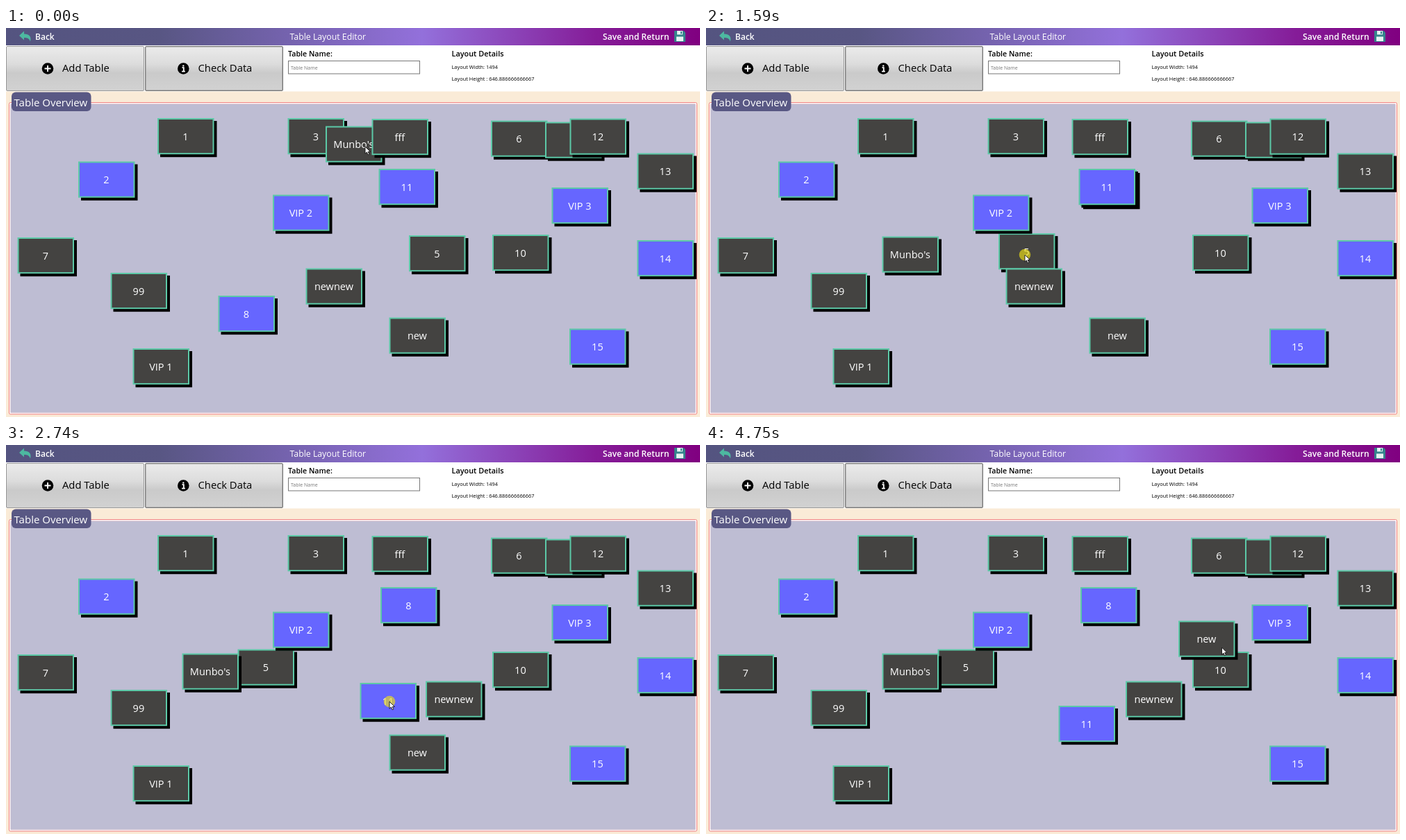
Animation, 999 px wide and 561 px high, one loop 4800 ms. Source, as an HTML page:

```html
<!DOCTYPE html>
<html lang="en">
<head>
<meta charset="utf-8">
<title>Table Layout Editor</title>
<style>
  html, body { margin: 0; width: 100%; height: 100%; overflow: hidden; background: #faebd7; }
  svg { display: block; width: 999px; height: 561px; font-family: "Open Sans", "Noto Sans", sans-serif; }
  .bold { font-weight: 600; }
  .light { fill: #fff; }
  .card rect { fill: #444341; stroke: #5cc9a7; stroke-width: 2; filter: drop-shadow(4px 4px 0.6px #000); }
  .card.blue rect { fill: #6666ff; }
  .card text { fill: #fff; font-size: 14.5px; font-weight: 500; text-anchor: middle; }
</style>
</head>
<body>
<svg viewBox="0 0 999 561">
  <defs>
    <linearGradient id="bar">
      <stop offset="0" stop-color="#545480"/>
      <stop offset=".22" stop-color="#585683"/>
      <stop offset=".6" stop-color="#9370db"/>
      <stop offset=".85" stop-color="#851c98"/>
      <stop offset="1" stop-color="#800080"/>
    </linearGradient>
    <linearGradient id="steel" x2="0" y2="1">
      <stop offset="0" stop-color="#ebebeb"/>
      <stop offset=".4" stop-color="#dcdcdc"/>
      <stop offset=".6" stop-color="#cacaca"/>
      <stop offset="1" stop-color="#d2d2d2"/>
    </linearGradient>
  </defs>

  <rect width="999" height="561" fill="#faebd7"/>
  <rect y="25" width="999" height="66.5" fill="#fff"/>
  <rect width="999" height="25" fill="url(#bar)"/>
  <path d="M19 11L26 4.5V8.5C33 8.5 37 12 35 19.5C33.5 15 30.5 14 26 14V17.5Z" fill="#4db8a0"/>
  <g class="light" font-size="12">
    <text class="bold" x="42" y="17">Back</text>
    <text x="408.5" y="17" font-size="12.3">Table Layout Editor</text>
    <text class="bold" x="859" y="17" font-size="12.1">Save and Return</text>
  </g>
  <path d="M962 4H975.5L978 6.5V20H962Z" fill="#35838c"/>
  <path d="M966 4H974V9.5H966ZM965 12.5H975V19H965Z" fill="#e6f2f2"/>
  <path d="M971 5H973V8.5H971Z" fill="#35838c"/>

  <g fill="url(#steel)" stroke="#999">
    <rect x=".5" y="26.5" width="198" height="64" rx="1.5"/>
    <rect x="200.5" y="26.5" width="198" height="64" rx="1.5" stroke="#777"/>
    <rect x="201.5" y="27.5" width="196" height="62" fill="none" stroke="#555" stroke-width=".6" stroke-dasharray="1 1"/>
  </g>
  <circle cx="60" cy="58.5" r="8.3"/>
  <path d="M60 54V63M55.5 58.5H64.5" stroke="#fff" stroke-width="2"/>
  <circle cx="255.3" cy="58.5" r="8.3"/>
  <path d="M253.5 57.2H255.8V62.5M253 62.7H257.8M254.2 54.5H256.4" fill="none" stroke="#fff" stroke-width="1.8"/>
  <g font-size="14.8">
    <text x="81" y="63">Add Table</text>
    <text x="276.5" y="63">Check Data</text>
  </g>
  <text class="bold" x="406" y="41" font-size="10.7">Table Name:</text>
  <rect x="406.5" y="47.5" width="189" height="18.5" fill="#fff" stroke="#777"/>
  <text x="410" y="59.5" font-size="7" fill="#777">Table Name</text>
  <text class="bold" x="641.5" y="41" font-size="10.9">Layout Details</text>
  <g font-size="7.4">
    <text x="641.5" y="59">Layout Width: 1494</text>
    <text x="641.5" y="75.5">Layout Height : 646.886666666667</text>
  </g>

  <rect x="4.5" y="107.5" width="990" height="449.5" rx="2" fill="#fff" stroke="#f08080"/>
  <rect x="6.5" y="109.5" width="986" height="445.5" rx="1" fill="#bebdd3" stroke="#e6cdd6"/>
  <rect x="8" y="92.5" width="114.5" height="27.5" rx="6" fill="#595884"/>
  <text class="light" x="11.5" y="112.7" font-size="15">Table Overview</text>

  <g id="cards"></g>
  <circle id="halo" r="8.3" fill="#efe014" opacity=".65"/>
  <path id="arrow" d="M0 0V10.2L2.4 8L4.1 11.8L5.9 11L4.2 7.4H7.4Z" fill="#fff" stroke="#111" stroke-width=".9"/>
</svg>
<script>
const LOOP = 4800, STEP = 63.4;

// label, left, top, blue; listed from back to front
const tables = [
  ["1", 218, 130], ["2", 104, 192.5, 1], ["10", 700, 298], ["8", 305.5, 386, 1],
  ["5", 580, 299], ["11", 536.5, 203, 1], ["3", 405.5, 130], ["Munbo's", 460, 141.5],
  ["fff", 526.5, 131], ["6", 698, 133.5], ["9", 776, 135.5], ["12", 811.5, 130.5],
  ["13", 908.5, 180.5], ["VIP 2", 384, 240.5, 1], ["VIP 3", 785.5, 230, 1],
  ["7", 16.5, 302], ["14", 908.5, 306, 1], ["99", 150.5, 353], ["new", 551.5, 417.5],
  ["newnew", 431.5, 346.5], ["15", 811, 433.5, 1], ["VIP 1", 182.5, 462]
];

// pointer path: step, x, y
const path = [
  [0, 517, 171], [1, 526, 215], [3, 526, 215], [4, 440, 262], [5, 340, 317], [6, 310.5, 330],
  [7, 367, 332], [12, 386, 398], [13, 386, 398], [15, 449, 354], [16, 535, 292], [17, 595, 250],
  [18, 619.5, 217], [21, 618, 330], [22, 620, 330], [27, 371.5, 325.5], [28, 371.5, 325.5],
  [30, 380, 367], [32, 463, 385], [33, 469, 386], [37, 635.5, 379], [39, 664, 254],
  [40, 579, 230], [43, 552, 370], [45, 550, 403], [48, 614, 456], [49, 616, 450],
  [51, 649, 399], [56, 742.5, 292]
];

// label: steps of grab and drop
const drags = {
  "Munbo's": [0, 6], "8": [12, 18], "5": [21, 27], "newnew": [32, 37], "11": [40, 45], "new": [48, 56]
};

function pointer(step) {
  const i = path.findIndex(key => key[0] > step);
  if (i < 0) return path[path.length - 1].slice(1);
  const [s0, x0, y0] = path[i - 1], [s1, x1, y1] = path[i];
  const u = (step - s0) / (s1 - s0), k = u * u * (3 - 2 * u);
  return [x0 + (x1 - x0) * k, y0 + (y1 - y0) * k];
}

const move = (node, x, y) => node.setAttribute("transform", `translate(${x} ${y})`);
const layer = document.getElementById("cards");
const halo = document.getElementById("halo");
const arrow = document.getElementById("arrow");

layer.innerHTML = tables.map(([label, , , blue]) =>
  `<g class="card${blue ? " blue" : ""}"><rect x="1" y="1" width="79.5" height="50.2"/><text x="40.4" y="31.8">${label}</text></g>`
).join("");

function draw(step) {
  tables.forEach(([label, x, y], i) => {
    const drag = drags[label];
    if (drag) {
      const [grab, drop] = drag;
      const [x0, y0] = pointer(grab);
      const [x1, y1] = pointer(Math.min(Math.max(step, grab), drop));
      x += x1 - x0;
      y += y1 - y0;
    }
    move(layer.children[i], x, y);
  });
  const [px, py] = pointer(step);
  move(arrow, px, py);
  move(halo, px, py);
  halo.style.display = step >= 4 && step < 57 ? "" : "none";
}

const start = performance.now();
function tick() {
  const time = (performance.now() - start) % LOOP;
  draw(Math.floor((time + 8) / STEP));
  requestAnimationFrame(tick);
}
tick();
</script>
</body>
</html>
```
